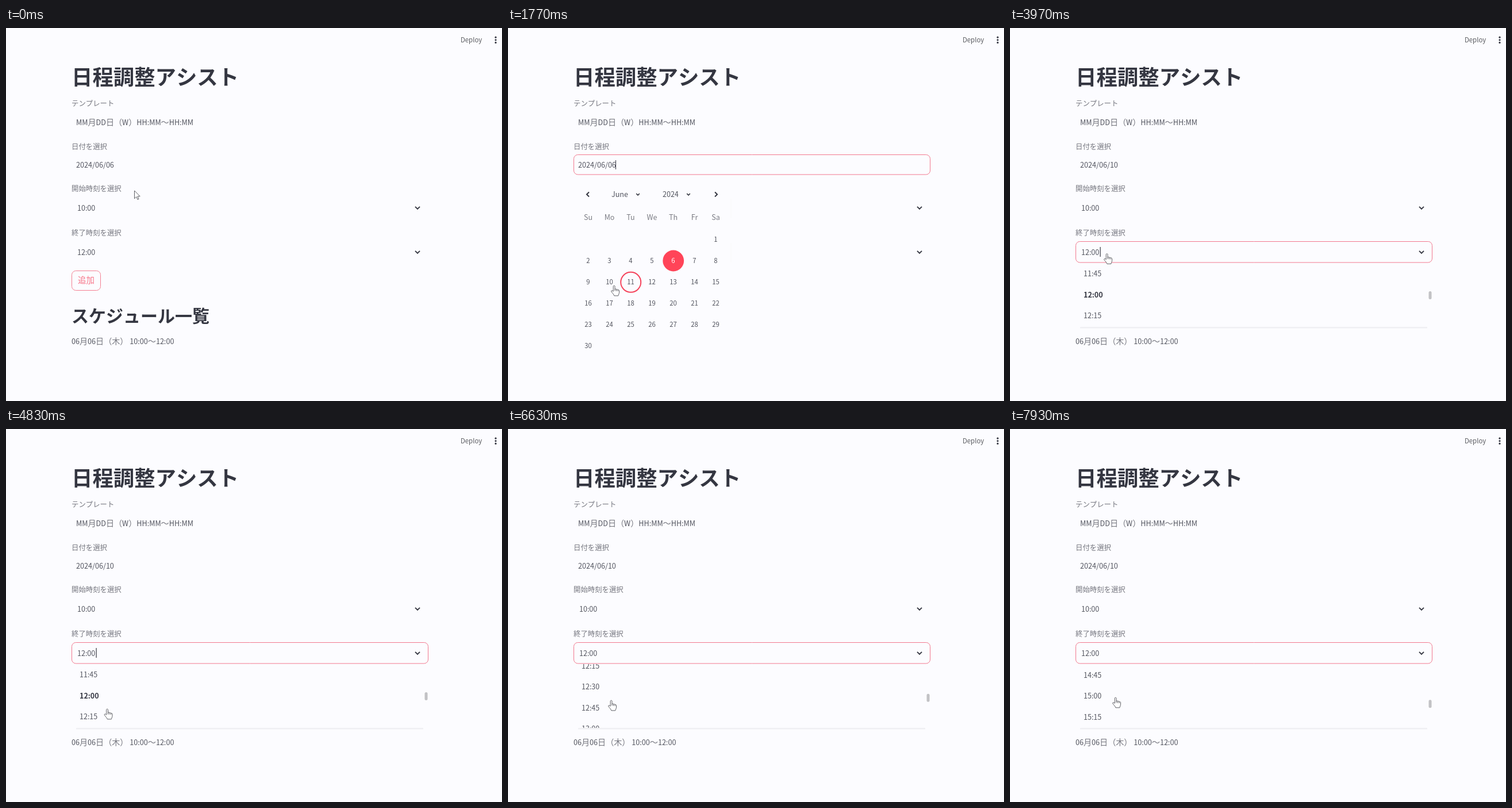
Recreate the animation shown at these times as an HTML page with a canvas. Size 863 by 649 pixels, loop 8000 ms.

```html
<!DOCTYPE html>
<html lang="ja">
<head>
<meta charset="utf-8">
<title>日程調整アシスト</title>
<style>
html, body { margin: 0; width: 100%; height: 100%; overflow: hidden; background: #fcfcff; }
canvas { display: block; }
</style>
</head>
<body>
<canvas id="stage" width="863" height="649"></canvas>
<script>
const ctx = document.getElementById('stage').getContext('2d');
const LOOP = 8000;
const BG = '#fcfcff', INK = '#343641', SOFT = '#52545e', RED = '#ff4458', LINE = '#f2788e', FAINT = '#f7f7fa';
const FONT = '"Noto Sans CJK JP", "Noto Sans CJK", "Noto Sans", sans-serif';
const LATIN = 0.895;

const OPEN_CAL = 600, CLOSE_CAL = 2770, OPEN_LIST = 3970;
const DAY_X = 139.5, DAY_Y = 368, CELL = 37, ITEM = 36.5;

// [time, x, y] of the pointer tip
const POINTER = [
  [70, 223, 282.5], [430, 232, 230], [1000, 232, 230], [1640, 206, 440], [1770, 184, 447.5],
  [1830, 184, 447.5], [2100, 174, 444], [2300, 174, 444], [2430, 174.5, 441.5], [2780, 174.5, 441.5],
  [3230, 168, 392], [4270, 168, 392], [4830, 175.5, 486.5], [5200, 175.5, 486.5], [5630, 179, 471.5],
  [6630, 179, 471.5], [7200, 182, 467.5], [7500, 182, 467.5], [7930, 183, 466.5]
];
// [time, offset] of the time list
const SCROLL = [[5200, 0], [5630, 74], [5900, 74], [6100, 86], [6600, 86], [6630, 88], [7200, 272], [7470, 272], [7930, 437.5]];
// [from, to] while the caret is shown
const DATE_CARET = [[600, 1130], [1660, 2770]];
const TIME_CARET = [[3970, 4270], [4770, 5300], [5900, 6630], [6890, 7500]];

const clamp = v => Math.max(0, Math.min(1, v));
const smooth = v => v * v * (3 - 2 * v);
const within = (spans, t) => spans.some(([a, b]) => t >= a && t < b);

function track(keys, t) {
  if (t <= keys[0][0]) return keys[0].slice(1);
  for (let i = 1; i < keys.length; i++) {
    const a = keys[i - 1], b = keys[i];
    if (t < b[0]) {
      const p = smooth((t - a[0]) / (b[0] - a[0]));
      return a.slice(1).map((v, k) => v + (b[k + 1] - v) * p);
    }
  }
  return keys[keys.length - 1].slice(1);
}

// Latin runs are slightly smaller, Japanese body runs slightly paler
function text(str, x, y, size, color = SOFT, { weight, align = 'left' } = {}) {
  const runs = str.match(/[ -~]+|[^ -~]+/g).map(s => {
    const latin = s.charCodeAt(0) < 128;
    const font = `${weight || (latin ? 400 : 300)} ${latin ? size * LATIN : size}px ${FONT}`;
    ctx.font = font;
    return { s, font, w: ctx.measureText(s).width, tone: latin || weight ? 1 : 0.8 };
  });
  if (align === 'center') x -= runs.reduce((sum, r) => sum + r.w, 0) / 2;
  const alpha = ctx.globalAlpha;
  ctx.fillStyle = color;
  for (const r of runs) {
    ctx.font = r.font;
    ctx.globalAlpha = alpha * r.tone;
    ctx.fillText(r.s, x, y);
    x += r.w;
  }
  ctx.globalAlpha = alpha;
}

function rect(x, y, w, h, color) {
  ctx.fillStyle = color;
  ctx.fillRect(x, y, w, h);
}

function box(x, y, w, h, stroke) {
  ctx.beginPath();
  ctx.roundRect(x, y, w, h, 7);
  ctx.strokeStyle = stroke;
  ctx.lineWidth = 1;
  ctx.stroke();
}

function disc(x, y, r, color) {
  ctx.beginPath();
  ctx.arc(x, y, r, 0, 7);
  ctx.fillStyle = color;
  ctx.fill();
}

function chevron(x, y, size, turn, width) {
  ctx.save();
  ctx.translate(x, y);
  ctx.rotate(turn);
  ctx.beginPath();
  ctx.moveTo(-size, -size / 2);
  ctx.lineTo(0, size / 2);
  ctx.lineTo(size, -size / 2);
  ctx.strokeStyle = INK;
  ctx.lineWidth = width;
  ctx.stroke();
  ctx.restore();
}

function drawPage(t) {
  rect(0, 0, 863, 649, BG);
  text('Deploy', 791, 25, 12.7, '#5a5b60');
  for (const y of [16.2, 20.8, 25.4]) disc(852, y, 1.6, INK);

  text('日程調整アシスト', 114, 98.5, 36.4, INK, { weight: 700 });
  text('テンプレート', 114, 136, 12.4);
  text('MM月DD日（W）HH:MM～HH:MM', 122, 168.5, 14.1);
  text('日付を選択', 114, 210.5, 12.4);
  text(t < CLOSE_CAL ? '2024/06/06' : '2024/06/10', 122, 243, 14.1);
  text('開始時刻を選択', 114, 284, 12.4);
  text('10:00', 124, 317.5, 14);
  text('終了時刻を選択', 114, 360.5, 12.4);
  text('12:00', 124, 394.5, 14);
  chevron(716, 312.8, 4, 0, 1.9);
  chevron(716, 389.8, 4, 0, 1.9);

  const active = 1 - clamp((t - 100) / 200);
  const button = (border, color) => {
    box(114.5, 422.5, 50, 34, border);
    text('追加', 139.5, 444.3, 14.4, color, { align: 'center' });
  };
  ctx.globalAlpha = 1 - active;
  button(FAINT, SOFT);
  ctx.globalAlpha = active;
  button('#f47f92', '#f6526a');
  ctx.globalAlpha = 1;

  text('スケジュール一覧', 114, 511.6, 30, INK, { weight: 700 });
  text('06月06日（木） 10:00～12:00', 114, 550.3, 14.1);
}

function hoveredDay(t) {
  const [x, y] = track(POINTER, t - 100);
  const col = Math.round((x - DAY_X) / CELL), row = Math.round((y - DAY_Y) / CELL);
  return row < 0 ? 0 : row * 7 + col - 5;
}

function drawCalendar(t) {
  const p = clamp((t - OPEN_CAL) / 230), center = { align: 'center' };
  box(114.5, 220.5, 620, 34.5, LINE);
  if (within(DATE_CARET, t)) rect(187, 230, 1, 16, INK);

  rect(114, 262, 274, 318, BG);
  rect(387.5, 297, 1, 34, FAINT);
  rect(387.5, 374, 1, 34, FAINT);
  ctx.save();
  ctx.translate(0, smooth(p) - 1);
  chevron(139, 289.5, 4, Math.PI / 2, 2);
  chevron(362, 289.5, 4, -Math.PI / 2, 2);
  chevron(226, 289.5, 2.8, 0, 1.5);
  chevron(314, 289.5, 2.8, 0, 1.5);
  ctx.globalAlpha = 0.5 + 0.5 * p;
  text('June', 180, 294, 14);
  text('2024', 269, 294, 14);
  'Su Mo Tu We Th Fr Sa'.split(' ').forEach((name, i) =>
    text(name, DAY_X + CELL * i, 334, 14, '#7b7c84', center));

  const hover = hoveredDay(t);
  for (let d = 1; d <= 30; d++) {
    const x = DAY_X + CELL * ((d + 5) % 7), y = DAY_Y + CELL * Math.floor((d + 5) / 7);
    const picked = d === 6;
    if (picked) {
      ctx.globalAlpha = 1;
      disc(x + 0.2, y, 18.4, RED);
    } else if (d === hover) {
      ctx.beginPath();
      ctx.arc(x + 0.2, y + 0.3, 17.5, 0, 7);
      ctx.strokeStyle = '#f5445c';
      ctx.lineWidth = 2;
      ctx.stroke();
    }
    text(String(d), x, y + 4, 12.6, picked ? '#fff' : SOFT, { align: 'center', weight: picked && p < 1 ? 700 : 400 });
    ctx.globalAlpha = 0.5 + 0.5 * p;
  }
  ctx.restore();
}

function drawList(t) {
  const [offset] = track(SCROLL, t);
  box(114.5, 371.5, 620, 36.5, LINE);
  if (within(TIME_CARET, t)) rect(156.5, 381, 1.2, 17, INK);

  rect(114, 409, 622, 116, BG);
  ctx.save();
  ctx.beginPath();
  ctx.rect(114, 409, 621, 112);
  ctx.clip();
  const first = Math.floor(offset / ITEM) - 1;
  for (let i = first; i < first + 6; i++) {
    const min = 705 + i * 15;
    const label = `${Math.floor(min / 60)}:${String(min % 60).padStart(2, '0')}`;
    const picked = min === 720;
    text(label, 128, 432 + i * ITEM - offset, 14, picked ? INK : SOFT, { weight: picked ? 700 : 400 });
  }
  ctx.restore();
  ctx.beginPath();
  ctx.roundRect(728.5, 458 + offset * 0.03, 5, 14, 2.5);
  ctx.fillStyle = '#c2c2c5';
  ctx.fill();
  rect(122, 520, 604, 2.5, '#f0f0f3');
}

const ARROW = new Path2D('M.5 .5V14.3L3.8 11.2L6 16L8 15.1L5.9 10.4H10.2Z');
const HAND = new Path2D('M4.2 10.8V2.2C4.2 .2 7 .2 7 2.2V7.2C7.3 6 9.4 6.2 9.5 7.6C10 6.7 12 7 12.1 8.3C12.8 7.6 14.5 8 14.5 9.6V12.6C14.5 15 13.2 16 12.8 18.4H5.8C5.2 16 2.8 14 .9 11.3C0 9.8 1.8 8.8 2.9 9.7Z');
const KNUCKLES = new Path2D('M7 7V10M9.5 7.6V10.3M12.1 8.3V10.6');
const BEAM = new Path2D('M-3.5 -7.5H-1.2L0 -6.8L1.2 -7.5H3.5M-3.5 7.5H-1.2L0 6.8L1.2 7.5H3.5M0 -6.8V6.8');

function pointerShape(t, y) {
  if (y < 256) return 'beam';
  if (t < 1000) return 'arrow';
  if (t < CLOSE_CAL + 60) return y > 349 ? 'hand' : 'arrow';
  return t >= OPEN_LIST || y < 408 ? 'hand' : 'arrow';
}

function drawPointer(t) {
  const [x, y] = track(POINTER, t), shape = pointerShape(t, y);
  ctx.save();
  ctx.translate(shape === 'hand' ? x - 5 : x, y);
  ctx.strokeStyle = '#4c4d54';
  ctx.lineWidth = 0.9;
  ctx.lineJoin = 'round';
  if (shape === 'beam') {
    ctx.strokeStyle = INK;
    ctx.lineWidth = 1.4;
    ctx.stroke(BEAM);
  } else {
    const path = shape === 'hand' ? HAND : ARROW;
    ctx.fillStyle = '#fff';
    ctx.fill(path);
    ctx.stroke(path);
    if (shape === 'hand') ctx.stroke(KNUCKLES);
  }
  ctx.restore();
}

const start = performance.now();
function frame() {
  const t = (performance.now() - start) % LOOP;
  drawPage(t);
  if (t >= OPEN_CAL && t < CLOSE_CAL) drawCalendar(t);
  if (t >= OPEN_LIST) drawList(t);
  drawPointer(t);
  requestAnimationFrame(frame);
}
frame();
</script>
</body>
</html>
```
